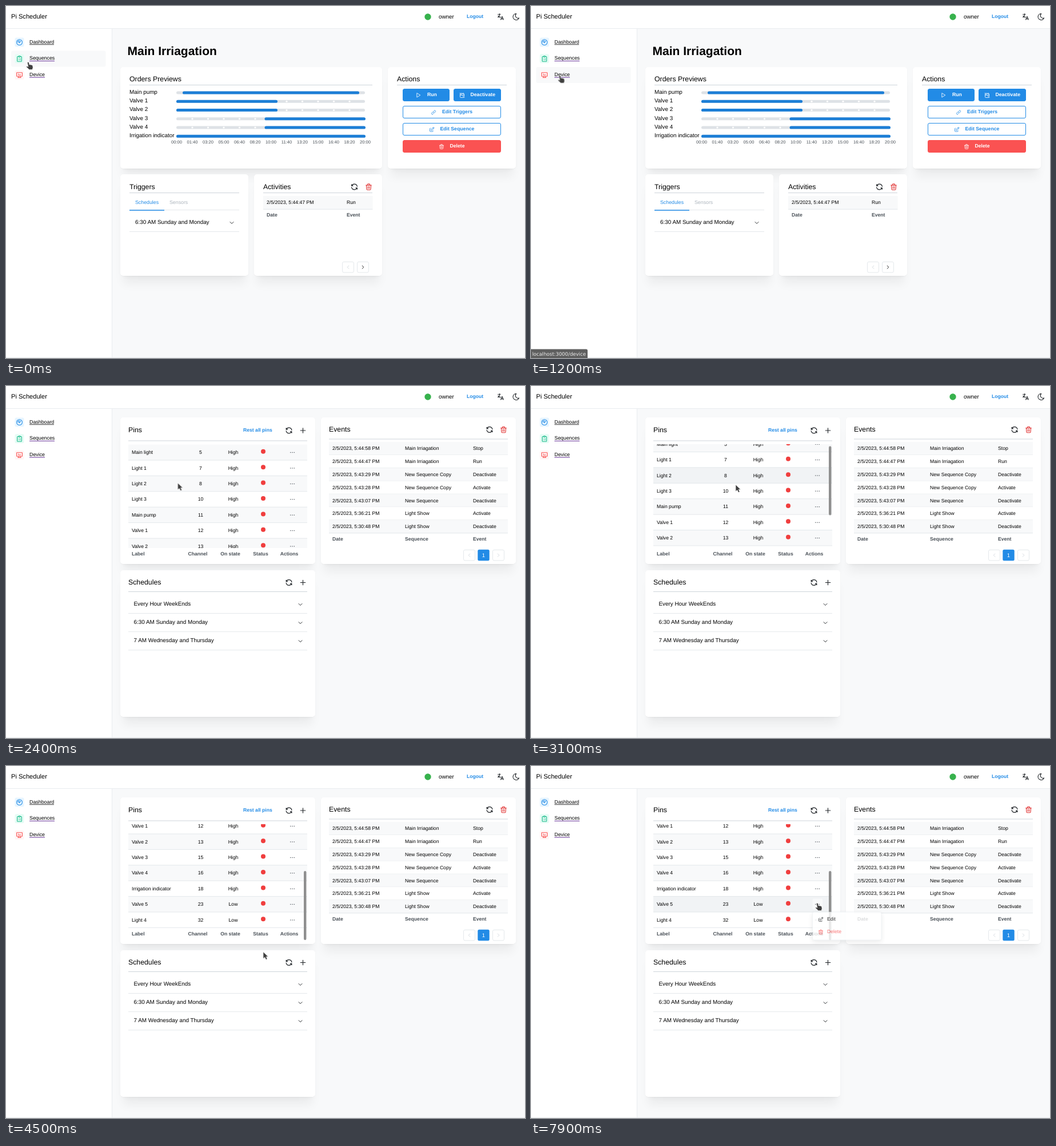
Recreate the animation shown at these times as an HTML page. Size 908x617 px, loop 8000 ms.

```html
<!DOCTYPE html>
<html lang="en">
<head>
<meta charset="utf-8">
<title>Pi Scheduler</title>
<style>
html, body { margin: 0; width: 100%; height: 100%; overflow: hidden; background: #f8f9fa; }
#stage { position: relative; width: 908px; height: 617px; overflow: hidden; background: #f8f9fa; }
svg, .page { position: absolute; left: 0; top: 0; width: 908px; height: 617px; }
text { font-family: "Liberation Sans", Arial, sans-serif; text-rendering: geometricPrecision; white-space: pre; }
.card {
  position: absolute; background: #fff; border-radius: 5px;
  box-shadow: 0 .7px 2px rgba(0,0,0,.05), 0 19px 16px -5px rgba(0,0,0,.05), 0 8px 8px -5px rgba(0,0,0,.04);
}

@property --s { syntax: "<number>"; inherits: true; initial-value: 0; }

/* hard switches */
#home, #device, #navSeq, #navDev, #status, .empty, .loaded, #hover, #thumb, #more, #hand, #arrow {
  animation: 8s step-end infinite;
}
#home { animation-name: until1300; }
#device { animation-name: from1300; }
#navSeq { animation-name: until400; }
#navDev { animation-name: navDev; }
#status { animation-name: status; }
.empty { animation-name: until2000; }
.loaded { animation-name: from2000; }
#thumb { animation-name: from2500; }
#more { animation-name: from6400; }
#hand { animation-name: hand; }
#arrow { animation-name: arrow; }
#hover { animation-name: hover; }
@keyframes until400 { 0% { opacity: 1 } 5%, 100% { opacity: 0 } }
@keyframes until1300 { 0% { opacity: 1 } 16.25%, 100% { opacity: 0 } }
@keyframes from1300 { 0% { opacity: 0 } 16.25%, 100% { opacity: 1 } }
@keyframes until2000 { 0% { opacity: 1 } 25%, 100% { opacity: 0 } }
@keyframes from2000 { 0% { opacity: 0 } 25%, 100% { opacity: 1 } }
@keyframes from2500 { 0% { opacity: 0 } 31.25%, 100% { opacity: 1 } }
@keyframes from6400 { 0% { opacity: 0 } 80%, 100% { opacity: 1 } }
@keyframes navDev { 0% { opacity: 0 } 5% { opacity: 1 } 26.5%, 100% { opacity: 0 } }
@keyframes status { 0% { opacity: 0 } 5% { opacity: .6 } 7.5% { opacity: 1 } 17.5%, 100% { opacity: 0 } }
@keyframes hand { 0% { opacity: 1 } 27% { opacity: 0 } 80%, 100% { opacity: 1 } }
@keyframes arrow { 0% { opacity: 0 } 27% { opacity: 1 } 80%, 100% { opacity: 0 } }
@keyframes hover {
  0% { opacity: 0; --row: 2 }
  31.25% { opacity: 1; --row: 2 }
  43.75% { opacity: 1; --row: 7 }
  51.25% { opacity: 1; --row: 8 }
  52.5% { opacity: 1; --row: 10 }
  53.75% { opacity: 0; --row: 11 }
  60% { opacity: 1; --row: 11 }
  62.5%, 100% { opacity: 1; --row: 10 }
}
#hover { transform: translateY(calc(var(--row) * 27.4px)); }

/* continuous motion */
#pins { animation: scroll 8s linear infinite; }
#list { transform: translateY(calc(var(--s) * -1px)); }
#thumb { transform: translateY(calc(var(--s) * .588px)); }
@keyframes scroll {
  0%, 36.25% { --s: 0 }
  37.5% { --s: 3 }
  38.75% { --s: 14 }
  40% { --s: 58 }
  41.25% { --s: 104 }
  42.5% { --s: 136 }
  43.75%, 100% { --s: 148 }
}
#overlay { animation: overlay 8s linear infinite; }
@keyframes overlay { 0%, 24.4% { opacity: 1 } 27.5%, 100% { opacity: 0 } }
#spin { transform-origin: 721px 183px; animation: spin 1s linear -.2s infinite; }
@keyframes spin { to { transform: rotate(360deg) } }
#menu { filter: drop-shadow(0 3px 4px rgba(0,0,0,.1)); animation: menu 8s linear infinite; }
@keyframes menu { 0%, 95.2% { opacity: 0 } 96.25% { opacity: .2 } 97.5% { opacity: .5 } 98.75%, 100% { opacity: .8 } }
#cursor { animation: cursor 8s linear infinite; }
@keyframes cursor {
  0%, 1.24% { transform: translate(39px, 98px) }
  1.25%, 12.4% { transform: translate(47px, 117.5px) }
  12.5% { transform: translate(48px, 119px) }
  13.75% { transform: translate(49px, 121px) }
  16.25% { transform: translate(52px, 122px) }
  20%, 26.25% { transform: translate(57px, 122px) }
  27.5% { transform: translate(120px, 135px) }
  28.75% { transform: translate(220px, 160px) }
  30% { transform: translate(300px, 170px) }
  31.25% { transform: translate(345px, 173px) }
  32.5%, 47.5% { transform: translate(358px, 173px) }
  48.75% { transform: translate(349px, 163px) }
  50% { transform: translate(340px, 155px) }
  51.25% { transform: translate(352px, 190px) }
  52.5% { transform: translate(385px, 250px) }
  53.75% { transform: translate(425px, 310px) }
  55% { transform: translate(447px, 341px) }
  56.25% { transform: translate(450px, 326px) }
  57.5% { transform: translate(447px, 305px) }
  58.75% { transform: translate(438px, 284px) }
  60% { transform: translate(418px, 270px) }
  61.25% { transform: translate(395px, 258px) }
  63.75% { transform: translate(350px, 247px) }
  66.25% { transform: translate(335px, 240px) }
  68.75% { transform: translate(385px, 238px) }
  70% { transform: translate(417px, 240px) }
  72.5% { transform: translate(456px, 242px) }
  73.75% { transform: translate(474px, 242px) }
  75% { transform: translate(487px, 242px) }
  76.25% { transform: translate(496px, 241px) }
  77.5%, 79.99% { transform: translate(499px, 241px) }
  80%, 100% { transform: translate(501px, 240px) }
}
</style>
</head>
<body>
<div id="stage"></div>
<script>
const BLUE = '#228be6', RED = '#fa5252', GRAY = '#495057', LINE = '#dee2e6', RULE = '#ced4da', STRIPE = '#f8f9fa';
const SMALL = 8.65, BODY = 9.9, HEAD = 12.3;

const ICON = {
  gauge: 'M3 12a9 9 0 1 0 18 0a9 9 0 1 0-18 0M11 13a1.4 1.4 0 1 0 2-2a1.4 1.4 0 1 0-2 2M13.4 10.6L16 8M7 12a5 5 0 0 1 5-5',
  clipboard: 'M9 5H7a2 2 0 0 0-2 2v12a2 2 0 0 0 2 2h10a2 2 0 0 0 2-2V7a2 2 0 0 0-2-2h-2M9 5a2 2 0 0 1 2-2h2a2 2 0 0 1 0 4h-2a2 2 0 0 1-2-2M9 12h.01M13 12h2M9 16h.01M13 16h2',
  desktop: 'M3 5a1 1 0 0 1 1-1h16a1 1 0 0 1 1 1v10a1 1 0 0 1-1 1H4a1 1 0 0 1-1-1zM7 20h10M9 16v4M15 16v4M9 12V8M12 12v-1M15 12v-2',
  translate: 'M4 5h7M9 3v2c0 4.4-2.2 8-5 8M5 9c0 2.1 3 3.9 6.7 4M12 20l4-9l4 9M19.1 18h-6.2',
  moon: 'M12 3h.4a7.5 7.5 0 0 0 7.9 12.4A9 9 0 1 1 12 3z',
  refresh: 'M20 11a8.1 8.1 0 0 0-15.5-2m-.5-4v4h4M4 13a8.1 8.1 0 0 0 15.5 2m.5 4v-4h-4',
  trash: 'M4 7h16M10 11v6M14 11v6M5 7l1 12a2 2 0 0 0 2 2h8a2 2 0 0 0 2-2l1-12M9 7V4a1 1 0 0 1 1-1h4a1 1 0 0 1 1 1v3',
  plus: 'M12 5v14M5 12h14',
  play: 'M7 4v16l13-8z',
  link: 'M10 14a3.5 3.5 0 0 0 5 0l4-4a3.5 3.5 0 0 0-5-5l-.5.5M14 10a3.5 3.5 0 0 0-5 0l-4 4a3.5 3.5 0 0 0 5 5l.5-.5',
  edit: 'M7 7H6a2 2 0 0 0-2 2v9a2 2 0 0 0 2 2h9a2 2 0 0 0 2-2v-1M20.4 6.6a2.1 2.1 0 0 0-3-3L9 12v3h3zM16 5l3 3',
  calendar: 'M9 5h9a2 2 0 0 1 2 2v9m-.2 3.8a2 2 0 0 1-1.8 1.2H6a2 2 0 0 1-2-2V7a2 2 0 0 1 1.2-1.8M16 3v4M8 3v1M4 11h7m4 0h5M3 3l18 18',
  down: 'M6 9l6 6l6-6',
  left: 'M15 6l-6 6l6 6',
  right: 'M9 6l6 6l-6 6'
};

// Text is placed by the middle of its capitals.
const text = (x, cy, s, size = SMALL, fill = '#000', extra = '') =>
  `<text x="${x}" y="${cy + size * .335}" font-size="${size}" fill="${fill}" ${extra}>${s}</text>`;
const bold = (x, cy, s, fill, size, extra = '') => text(x, cy, s, size, fill, 'font-weight="700" ' + extra);
const MID = 'text-anchor="middle"';
const rect = (x, y, w, h, fill, extra = '') =>
  `<rect x="${x}" y="${y}" width="${w}" height="${h}" fill="${fill}" ${extra}/>`;
const rule = (x1, x2, y, color = LINE, w = .8) =>
  `<path d="M${x1} ${y}H${x2}" stroke="${color}" stroke-width="${w}"/>`;
const dot = (x, y, r, fill) => `<circle cx="${x}" cy="${y}" r="${r}" fill="${fill}"/>`;
const icon = (name, cx, cy, size = 14.6, color = '#212529', w = 1.9) =>
  `<path d="${ICON[name]}" transform="translate(${cx - size / 2} ${cy - size / 2}) scale(${size / 24})" fill="none" stroke="${color}" stroke-width="${w}" stroke-linecap="round" stroke-linejoin="round"/>`;
const each = (list, fn) => list.map(fn).join('');
const svg = body => `<svg viewBox="0 0 908 617">${body}</svg>`;
const card = (x, y, w, h) => `<div class="card" style="left:${x}px;top:${y}px;width:${w}px;height:${h}px"></div>`;
const title = (x, cy, s, x2, lineY) => text(x, cy, s, HEAD) + rule(x, x2, lineY, RULE, 1);

function button(x, y, w, name, label, iconX, textX, color, filled) {
  const ink = filled ? '#fff' : color;
  return rect(x + .5, y + .5, w - 1, 21, filled ? color : '#fff', `rx="2.5" stroke="${color}"`) +
    icon(name, iconX, y + 11.5, 10.5, ink) + bold(textX, y + 10.5, label, ink, 8.7);
}
const pageBtn = (x, y, name, color) =>
  rect(x + .5, y + .5, 20, 18.6, '#fff', `rx="2.5" stroke="${LINE}" stroke-width=".8"`) + icon(name, x + 10.5, y + 9.8, 10.5, color);

function chart() {
  const rows = [['Main pump', 309, 618], ['Valve 1', 298, 475], ['Valve 2', 298, 475],
    ['Valve 3', 452.5, 629], ['Valve 4', 452.5, 629], ['Irrigation indicator', 298, 629]];
  const ticks = [...Array(13).keys()];
  const pad = n => String(n).padStart(2, '0');
  return each(rows, ([label, a, b], i) => {
    const y = 152 + i * 15.25;
    return text(216, y - 1.5, label, BODY) + rect(298, y - 2.5, 330, 5, LINE, 'rx="2.5"') +
      each(ticks.slice(1, 12), k => dot(298.5 + k * 27.5, y, 1.6, '#fff')) +
      rect(a, y - 2.6, b - a, 5.2, '#1c7ed6', 'rx="2.6"');
  }) + each(ticks, k => text(298.5 + k * 27.5, 238, pad(k * 100 / 60 | 0) + ':' + pad(k * 100 % 60), 7.6, GRAY, MID));
}

const home = card(200, 107, 458, 178) + card(668, 107, 224, 178) + card(200, 295, 224, 178) + card(434, 295, 224, 178) + svg(
  bold(212.5, 78.5, 'Main Irriagation', '#000', 21) +
  title(216, 127.5, 'Orders Previews', 641, 138.5) + chart() +
  title(684, 127.5, 'Actions', 876, 138.5) +
  button(694, 145, 82, 'play', 'Run', 721, 737, BLUE, true) +
  button(783, 145, 83, 'calendar', 'Deactivate', 798, 812.5, BLUE, true) +
  button(694, 175, 172, 'link', 'Edit Triggers', 748, 763, BLUE) +
  button(694, 205, 172, 'edit', 'Edit Sequence', 745, 759.5, BLUE) +
  button(694, 235, 172, 'trash', 'Delete', 762, 776.5, RED, true) +
  title(216, 316.5, 'Triggers', 408, 327.5) +
  text(226, 344.5, 'Schedules', 8.8, BLUE) + text(286, 344.5, 'Sensors', 8.8, '#adb5bd') +
  rule(216, 408, 357.5) + rule(216, 277, 358, BLUE, 1.4) +
  text(226, 379, '6:30 AM Sunday and Monday', BODY) + icon('down', 395, 380, 12) + rule(216, 408, 395.5) +
  title(450, 316.5, 'Activities', 641, 327.5) + icon('refresh', 609.5, 317) + icon('trash', 634.5, 317, 14, '#e03131') +
  rect(450, 333, 191.5, 23, STRIPE) + rule(450, 641.5, 356.3) +
  text(456, 344, '2/5/2023, 5:44:47 PM') + text(596, 344, 'Run') +
  bold(456, 366.5, 'Date', GRAY) + bold(596, 366.5, 'Event', GRAY) +
  pageBtn(588, 448, 'left', '#ced4da') + pageBtn(614, 448, 'right', '#000'));

function pinList() {
  const pins = [['Main light', 5], ['Light 1', 7], ['Light 2', 8], ['Light 3', 10], ['Main pump', 11], ['Valve 1', 12],
    ['Valve 2', 13], ['Valve 3', 15], ['Valve 4', 16], ['Irrigation indicator', 18], ['Valve 5', 23], ['Light 4', 32]];
  const top = i => 102.6 + i * 27.4;
  const back = each(pins, (p, i) => rect(214, top(i), 313, 27.4, i % 2 ? '#fff' : STRIPE));
  const front = each(pins, ([label, channel], i) => {
    const y = top(i) + 13.7;
    return text(220, y, label) + text(340.5, y, channel, SMALL, '#000', MID) +
      text(397.5, y, channel > 20 ? 'Low' : 'High', SMALL, '#000', MID) + dot(450, y - 1.5, 4, '#f03e3e') +
      each([-3.2, 0, 3.2], d => dot(501 + d, y + .3, .75, GRAY)) + rule(214, 527, top(i + 1));
  });
  const foot = [['Channel', 335.5], ['On state', 392.5], ['Status', 445.5], ['Actions', 495.5]];
  return `<g id="pins"><g clip-path="url(#view)"><g id="list">${back}` +
    rect(214, 102.6, 313, 27.4, '#f1f3f5', 'id="hover"') + rect(492.5, 380.5, 17.5, 19, STRIPE, 'id="more" rx="2.5"') +
    `${front}</g></g>` + bold(220, 294.5, 'Label', GRAY) + each(foot, ([s, x]) => bold(x, 294.5, s, GRAY, SMALL, MID)) +
    rect(521, 97, 4.4, 121, '#8f8f8f', 'id="thumb" rx="2.2"') + '</g>';
}

function events() {
  const rows = [['44:58', 'Main Irriagation', 'Stop'], ['44:47', 'Main Irriagation', 'Run'],
    ['43:29', 'New Sequence Copy', 'Deactivate'], ['43:28', 'New Sequence Copy', 'Activate'],
    ['43:07', 'New Sequence', 'Deactivate'], ['36:21', 'Light Show', 'Activate'], ['30:48', 'Light Show', 'Deactivate']];
  return title(565, 76, 'Events', 878, 93) + icon('refresh', 846, 76.5) + icon('trash', 870.5, 76.5, 14, '#e03131') +
    each(rows, ([time, name, event], i) => {
      const y = 109.3 + i * 22.85;
      return rect(565, y - 11.4, 313, 22.85, i % 2 ? '#fff' : STRIPE) + rule(565, 878, y + 11.4) +
        text(571, y, `2/5/2023, 5:${time} PM`) + text(698, y, name) + text(817, y, event);
    }) +
    bold(571, 268.5, 'Date', GRAY) + bold(698, 268.5, 'Sequence', GRAY) + bold(817, 268.5, 'Event', GRAY) +
    pageBtn(800, 286.8, 'left', '#ced4da') + rect(825.3, 286.8, 20.4, 19.4, BLUE, 'rx="2.5"') +
    text(835.5, 296.7, '1', 9.5, '#fff', MID) + pageBtn(851, 286.8, 'right', '#ced4da');
}

const overlay = '<g id="overlay">' + rect(551, 55, 341, 257, '#fff', 'rx="5" opacity=".75"') +
  `<g id="spin" fill="none" stroke="${BLUE}" stroke-width="2.6"><circle cx="721" cy="183" r="9.8" stroke-opacity=".5"/><path d="M711.2 183A9.8 9.8 0 0 1 721 173.2"/></g></g>`;

const empty = (y, what, action) => '<g class="empty">' +
  text(370.5, y, `No ${what} defined`, BODY, '#000', MID) + bold(370.5, y + 19, `Add new ${action}`, BLUE, SMALL, MID) + '</g>';

const device = card(200, 55, 341, 257) + card(551, 55, 341, 257) + card(200, 323, 341, 257) + svg(
  '<clipPath id="view"><rect x="214" y="102" width="313" height="182"/></clipPath>' +
  title(214, 77, 'Pins', 527, 96) + bold(415, 77.5, 'Rest all pins', BLUE) + icon('refresh', 495, 78) + icon('plus', 519.5, 78) +
  empty(189, 'pins', 'pin') + `<g class="loaded">${pinList()}</g>` +
  title(214, 343.5, 'Schedules', 527, 360.5) + icon('refresh', 495, 344.5) + icon('plus', 519.5, 344.5) +
  empty(455.5, 'schedules', 'schedule') +
  '<g class="loaded">' + each(['Every Hour WeekEnds', '6:30 AM Sunday and Monday', '7 AM Wednesday and Thursday'], (s, i) =>
    text(223.5, 381.5 + i * 32.2, s, BODY) + icon('down', 515, 383 + i * 32.2, 12) + rule(214, 527, 398.5 + i * 32.2)) + '</g>' +
  events() + overlay);

const nav = [['Dashboard', 'gauge', BLUE, '#e7f5ff', 84, '#222'], ['Sequences', 'clipboard', '#12b886', '#e6fcf5', 85, '#551a8b'],
  ['Device', 'desktop', RED, '#fff5f5', 68, '#551a8b']];
const chrome = svg(
  rect(0, 0, 908, 39, '#fff') + rect(0, 39, 185, 578, '#fff') +
  rule(0, 908, 39.5, '#e9ecef', 1) + `<path d="M185.5 40V617" stroke="#e9ecef"/>` + rule(0, 908, 616.5, '#e9ecef', 1) +
  text(9, 18.5, 'Pi Scheduler', 11.1) + dot(738, 19, 5.7, '#37b24d') + text(757, 18.5, 'owner', BODY) +
  bold(806, 18.5, 'Logout', BLUE, 8.6) + icon('translate', 865.5, 19) + icon('moon', 892.5, 19) +
  rect(9, 78.5, 165.5, 28, STRIPE, 'id="navSeq" rx="3"') + rect(9, 107, 165.5, 28, STRIPE, 'id="navDev" rx="3"') +
  each(nav, ([s, name, color, tint, end, under], i) => {
    const y = 62.6 + i * 28.75;
    return rect(15.5, y - 7.2, 16, 16, tint, 'rx="2.5"') + icon(name, 23.5, y + 1, 13.2, color) +
      text(41, y, s, 8.85) + rule(41, end, y + 5, under, .9);
  }) +
  '<g id="status"><path d="M0 601.5H96.5a2.5 2.5 0 0 1 2.5 2.5V617H0z" fill="#5f5f5f"/>' +
  text(2, 610, 'localhost:3000/device', 8.55, '#eee', `style="font-family:'DejaVu Sans',sans-serif"`) + '</g>');

const front = svg(
  '<g id="menu">' + rect(492.5, 256, 120.5, 49, '#fff', 'rx="2.8" stroke="#e9ecef" stroke-width=".7"') +
  icon('edit', 507, 269, 10.5) + text(518, 268.5, 'Edit') +
  icon('trash', 507, 291, 10.5, RED) + text(518, 290.5, 'Delete', SMALL, RED) + '</g>' +
  '<g id="cursor" fill="#3f3f3f" stroke="#fff" stroke-width=".6" stroke-linejoin="round">' +
  '<path id="hand" d="M-1.6 1.3Q-1.2 0 0 .2Q1 .4 1.3 1.6L1.9 5Q2.6 4.2 3.5 5Q4.4 4.4 5.2 5.4Q6.2 4.9 6.8 6Q7.8 6 7.8 7.5L8.2 10.5L7.3 12V13.6H1L.6 12.4L-2.8 9.5Q-3.8 8-2.4 7.4L-.2 8.4Z"/>' +
  '<path id="arrow" d="M0 0V11.8L2.8 9.4L4.8 13.6L7.2 12.4L5.2 8.4H8.8Z"/></g>');

document.getElementById('stage').innerHTML =
  `<div class="page" id="home">${home}</div><div class="page" id="device">${device}</div>${chrome}${front}`;
</script>
</body>
</html>
```
